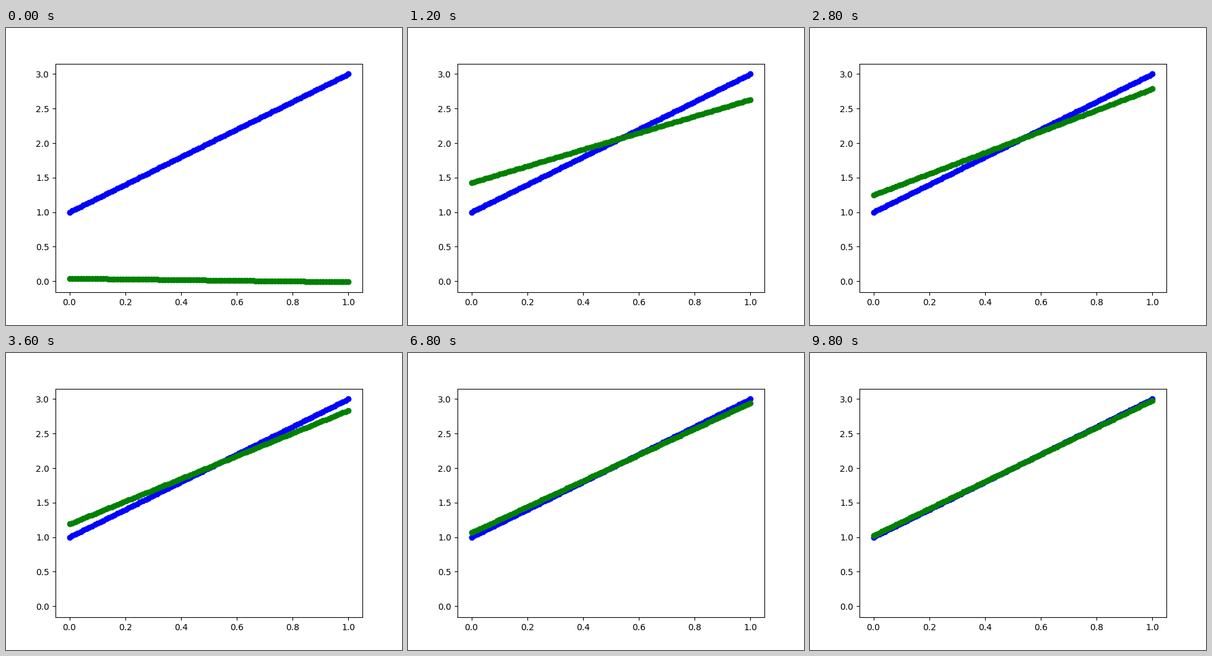
A matplotlib script that plays this animation: 640 px wide and 480 px high, repeating every 10000 ms.

```python
import numpy as np
import matplotlib.pyplot as plt
from matplotlib.animation import FuncAnimation

FRAMES = 50
INTERVAL = 200
STEPS_PER_FRAME = 5
RATE = 0.1

x = np.linspace(0, 1, 100)
y = 2 * x + 1


def descend(w, b):
    """One gradient step on the mean squared error."""
    err = w * x + b - y
    return w - RATE * 2 * np.mean(err * x), b - RATE * 2 * np.mean(err)


def fit_history(w, b):
    """Fitted values at each frame of the training run."""
    history = []
    for _ in range(FRAMES):
        history.append(w * x + b)
        for _ in range(STEPS_PER_FRAME):
            w, b = descend(w, b)
    return history


fits = fit_history(w=-0.051, b=0.041)

fig, ax = plt.subplots(figsize=(6.4, 4.8), dpi=100)
ax.plot(x, y, "bo")
fit_dots, = ax.plot(x, fits[0], "go")

# Hold the limits of the opening view for the whole run.
ax.set_xlim(ax.get_xlim())
ax.set_ylim(ax.get_ylim())


def update(i):
    fit_dots.set_ydata(fits[i])
    return fit_dots,


anim = FuncAnimation(fig, update, frames=FRAMES, init_func=lambda: update(0),
                     interval=INTERVAL, repeat=True, repeat_delay=0)
plt.show()
```
